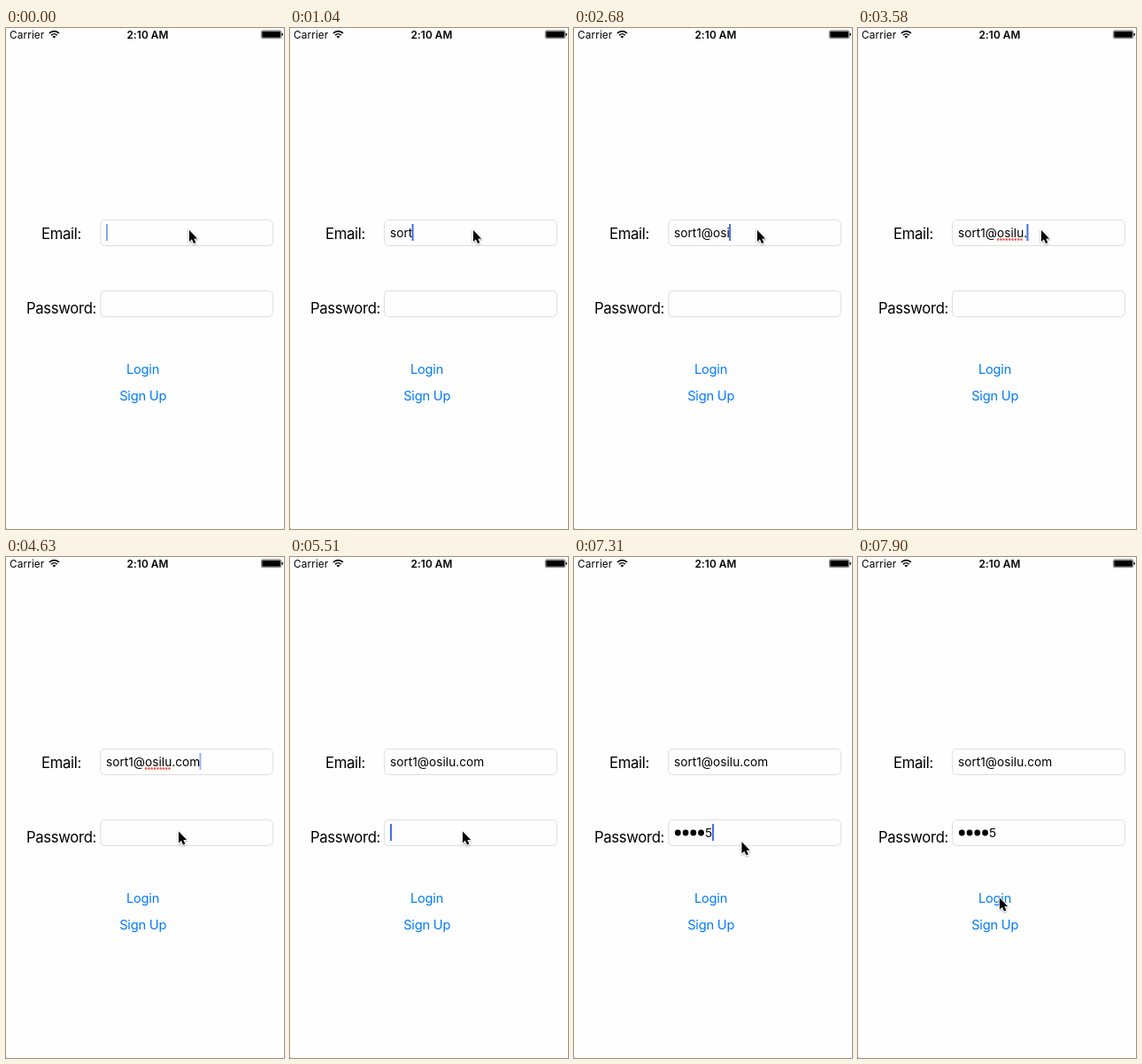
Write an HTML page that moves like this. It is 314 px wide and 565 px high and loops after 8 s.

```html
<!DOCTYPE html>
<html lang="en">
<head>
<meta charset="utf-8">
<title>Login form</title>
<style>
  html, body { margin: 0; width: 100%; height: 100%; overflow: hidden; background: #fefefe; }
  svg { display: block; width: 314px; height: 565px; font-family: Inter, Roboto, sans-serif; }
  .status { font-size: 11.8px; letter-spacing: .01em; }
  .time { font-weight: 600; }
  .label { font-size: 16.7px; letter-spacing: -.02em; }
  .button { font-size: 14.7px; letter-spacing: -.016em; fill: #007aff; text-anchor: middle; }
  .value { font-size: 13.7px; }
  .field { fill: #fefefe; stroke: #dedede; }
</style>
</head>
<body>
<svg viewBox="0 0 314 565">
  <defs>
    <filter id="soft" x="-50%" y="-50%" width="200%" height="200%">
      <feDropShadow dx="0" dy="1" stdDeviation="1" flood-opacity=".4"/>
    </filter>
  </defs>
  <rect width="314" height="565" fill="#fefefe"/>
  <rect y="564" width="1" height="1" fill="#bbb"/>

  <text class="status" x="4" y="11.6">Carrier</text>
  <g fill="none" stroke="#000" stroke-width="1.7">
    <path d="M48.9 5.9a7.8 7.8 0 0 1 11 0M51.1 8.1a4.7 4.7 0 0 1 6.6 0"/>
    <path d="M54.4 11.6l-1.9-1.9a2.7 2.7 0 0 1 3.8 0z" fill="#000" stroke="none"/>
  </g>
  <text class="status time" x="160" y="11.6" text-anchor="middle">2:10 AM</text>
  <rect x="288.4" y="2.9" width="22.4" height="8.8" rx="1.6" fill="none" stroke="#555" stroke-width=".8"/>
  <rect x="289.3" y="3.8" width="20.6" height="7" rx=".8"/>
  <path d="M311.4 5.6q1.5.3 1.5 1.7t-1.5 1.7z"/>

  <text class="label" x="40" y="237.8">Email:</text>
  <text class="label" x="23" y="321.8">Password:</text>
  <rect class="field" x="106.5" y="216.5" width="195" height="29" rx="5"/>
  <rect class="field" x="106.5" y="296.5" width="195" height="29" rx="5"/>
  <text class="button" x="154.5" y="390">Login</text>
  <text class="button" x="154.7" y="420">Sign Up</text>

  <text class="value" id="email" x="113" y="235.5"></text>
  <path id="underline" fill="none" stroke="#f0443e" stroke-width="2.5" stroke-linecap="round" stroke-dasharray="0 3.3"/>
  <path id="dots" fill="none" stroke="#000" stroke-width="6.8" stroke-linecap="round" stroke-dasharray="0 8.75"/>
  <text class="value" id="digit" y="315.5"></text>
  <rect id="caret" width="2" height="19" fill="#426bf2"/>
  <path id="arrow" d="M0 0V13L2.9 10.3L5.1 15L7.4 14L5.3 9.4H9.2Z" stroke="#fff" stroke-width="1.4" paint-order="stroke" filter="url(#soft)"/>
</svg>
<script>
const LOOP = 8000, LEFT = 113, DOT_PITCH = 8.75;
const TICK = 149.1, TICK_LEAD = 10;  // the screen refreshes at this slow rate
const KEY_GAP = 140;                 // ms between keys within a burst
const BLINK = 1050, BLINK_OFFSET = 1000;
const BLUR = 5360, FOCUS = 5500;     // leaving the email field, entering the password field

// Bursts of typing: [start ms, text]
const emailKeys = spread([[590, 'sort'], [1750, '1'], [2060, '@'], [2390, 'osilu'], [3560, '.'], [3735, 'com']]);
const passwordKeys = spread([[5970, '12'], [6550, '3'], [6850, '4'], [7150, '5']]);
const keyTimes = [...emailKeys, ...passwordKeys].map(key => key.time);

const $ = id => document.getElementById(id);
const email = $('email'), digit = $('digit'), caret = $('caret');
const set = (node, attributes) => {
  for (const name in attributes) node.setAttribute(name, attributes[name]);
};
const ramp = (t, from, to) => Math.min(1, Math.max(0, (t - from) / (to - from)));
const ease = x => x * x * (3 - 2 * x);

function spread(bursts) {
  return bursts.flatMap(([start, text]) =>
    [...text].map((char, i) => ({ char, time: start + i * KEY_GAP })));
}

const typed = (keys, t) => keys.filter(key => key.time <= t).map(key => key.char).join('');

function caretAlpha(t) {
  if (t >= BLUR && t < FOCUS) return 0;
  const lastAction = Math.max(-BLINK_OFFSET, ...[...keyTimes, FOCUS].filter(time => time <= t));
  const phase = (t - lastAction) % BLINK;
  return 1 - ramp(phase, 520, 700) + ramp(phase, 920, BLINK);
}

function arrowTip(t) {
  const toPassword = ease(ramp(t, 4180, 4620)), toLogin = ease(ramp(t, 7160, 7740));
  return [207 - 12 * toPassword - 35 * toLogin, 228 + 81.5 * toPassword + 75 * toLogin];
}

function drawUnderline() {
  const address = emailKeys.map(key => key.char).join('');
  email.textContent = address;
  const edge = mark => LEFT + email.getSubStringLength(0, address.indexOf(mark));
  const atSign = LEFT + email.getSubStringLength(0, address.indexOf('@') + 1);
  set($('underline'), { d: `M${atSign + 1} 238.5H${edge('.') - .5}` });
}

function draw(t) {
  const address = typed(emailKeys, t), secret = typed(passwordKeys, t);
  const hidden = Math.max(0, secret.length - 1);

  email.textContent = address;
  digit.textContent = secret.slice(-1);
  set(digit, { x: LEFT + hidden * DOT_PITCH });
  set($('dots'), { d: hidden ? `M${LEFT + 4.3} 311h${(hidden - 1) * DOT_PITCH + .1}` : '' });

  const length = t >= FOCUS ? secret.length * DOT_PITCH : address && email.getComputedTextLength();
  set(caret, { x: LEFT + Math.max(0, length - .7), y: t >= FOCUS ? 301 : 221, opacity: caretAlpha(t) });

  set($('underline'), { opacity: address.includes('.') && t < BLUR ? 1 : 0 });
  set($('arrow'), { transform: `translate(${arrowTip(t)})` });
}

const start = performance.now();
function tick(now) {
  const t = Math.max(0, now - start) % LOOP;
  draw(Math.floor((t + TICK_LEAD) / TICK) * TICK);
  requestAnimationFrame(tick);
}
drawUnderline();
draw(0);
requestAnimationFrame(tick);
</script>
</body>
</html>
```
